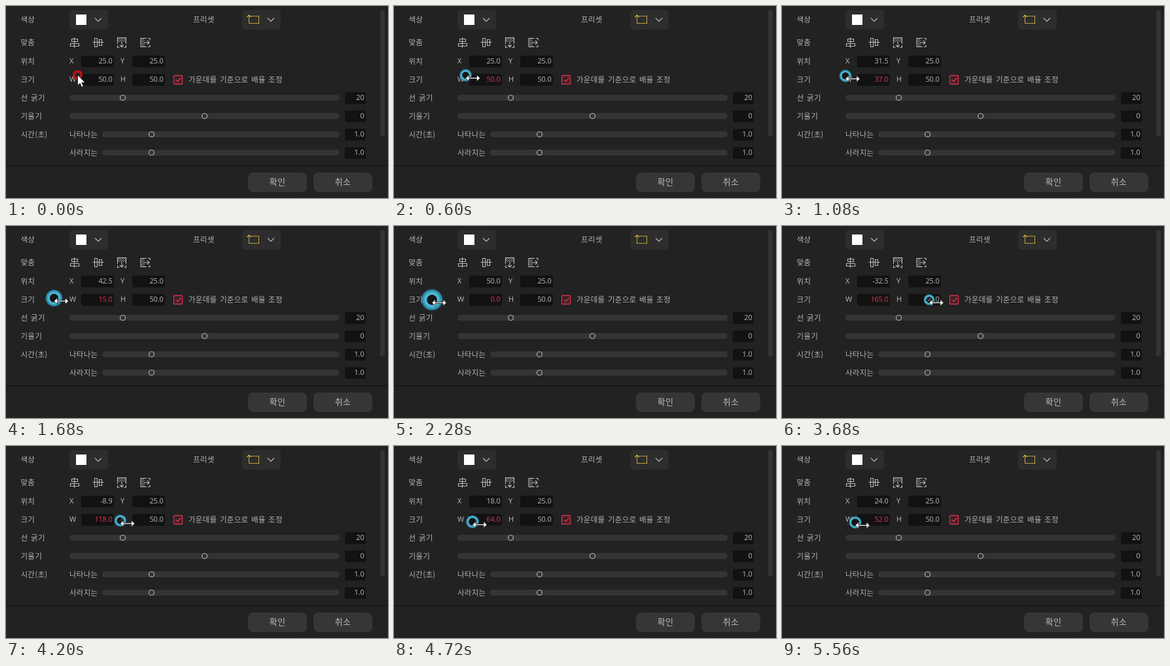
Write an HTML page that moves like this. It is 584 px wide and 294 px high and loops after 5.6 s.

```html
<!DOCTYPE html>
<html lang="ko">
<head>
<meta charset="utf-8">
<title>크기 조정</title>
<style>
html, body { margin: 0; width: 100%; height: 100%; overflow: hidden; background: #222; }
svg { display: block; width: 584px; height: 294px; }
text { font: 300 11.5px "Noto Sans CJK KR", "Noto Sans CJK", "Noto Sans KR", sans-serif; fill: #b4b4b4; letter-spacing: .28px; word-spacing: 1px; }
.num { font: 11px "Open Sans", "Noto Sans", sans-serif; letter-spacing: -.2px; fill: #bababa; }
.end { text-anchor: end; }
.btn { font-size: 13px; text-anchor: middle; fill: #bcbcbc; }
.line { fill: none; stroke: #b8b8b8; stroke-width: 1.1; }
</style>
</head>
<body>
<svg viewBox="0 0 584 294">
  <defs>
    <radialGradient id="glow">
      <stop id="hole" offset=".5" stop-color="#58c6e4" stop-opacity="0"/>
      <stop id="rim" offset=".5" stop-color="#58c6e4"/>
      <stop id="mid" offset=".75" stop-color="#2e9fc0" stop-opacity=".85"/>
      <stop offset="1" stop-color="#1c7896" stop-opacity="0"/>
    </radialGradient>
    <pattern id="hatch" width="3" height="3" patternUnits="userSpaceOnUse">
      <path d="M-1 1l2-2M0 3l3-3M2 4l2-2" stroke="#b8b8b8" stroke-width=".9"/>
    </pattern>
  </defs>
  <rect width="584" height="294" fill="#222"/>
  <g id="panel"></g>

  <rect x="107" y="13" width="16" height="16" fill="#fff"/>
  <g class="line">
    <path d="M136 18.5l5 5 5-5M400 18.5l5 5 5-5"/>
    <path d="M104.5 48v16M100.500 50.5h9v4h-9zM98.5 57.5h13v4h-13z"/>
    <path d="M132.500 55.5h17M135.5 49.5h4v13h-4zM142.5 51.5h4v9h-4z"/>
    <path d="M170.5 58v-9.5h13v9.5M170.5 60v3.500h3M183.5 60v3.500h-3M177 55v8M174 60l3 3 3-3"/>
    <path d="M215 49.500h-9v13h9M217 49.500h3v3M217 62.500h3v-3M211 56h8M216 53l3 3-3 3"/>
  </g>
  <rect x="171" y="49" width="12" height="6" fill="url(#hatch)"/>
  <rect x="207" y="50" width="5" height="12" fill="url(#hatch)"/>
  <path d="M371.5 15.5h15v11h-15z" fill="none" stroke="#e0bc38" stroke-width="1.1" stroke-dasharray="2.5 .7"/>
  <path d="M368.5 17l3-3 3 3" fill="none" stroke="#e0bc38" stroke-width="1.1"/>
  <rect x="256.5" y="106.5" width="13" height="13" rx="1" fill="#e0304e" fill-opacity=".1" stroke="#e0304e" stroke-width="1.3"/>
  <path d="M259.5 112.800l3 3 5-5.600" fill="none" stroke="#e0304e" stroke-width="1.4"/>

  <g id="halo">
    <circle id="core" fill="#121416"/>
    <circle id="ring" fill="url(#glow)"/>
  </g>
  <circle id="ripple" cx="109.5" cy="105.5" fill="none" stroke="#b51218"/>
  <path id="arrow" d="M109.5 105.5v16.2l3.700-3.500 2.500 6 2.700-1.100-2.500-5.800h5z" fill="#fff" stroke="#111" stroke-width=".8"/>
  <path id="drag" d="M-11 .5l5-5v4h12v-4l5 5-5 5v-4h-12v4z" fill="#fff" stroke="#111" stroke-width=".8"/>
</svg>
<script>
const LOOP = 5600, STEP = 40, DRAG_START = 520;
const $ = id => document.getElementById(id);
const panel = $('panel');

function add(tag, attrs, content) {
  const el = document.createElementNS('http://www.w3.org/2000/svg', tag);
  for (const k in attrs) el.setAttribute(k, attrs[k]);
  if (content) el.textContent = content;
  return panel.appendChild(el);
}
const box = (x, y, width, height, rx, fill) => add('rect', { x, y, width, height, rx, fill });
const label = (x, y, str) => add('text', { x, y: y + 4.8 }, str);
const num = (x, y, str, cls = 'num') => add('text', { x, y: y + 4, class: cls }, str);

function field(x, y, width, value) {
  box(x, y - 8, width, 18, 2, '#121212');
  return num(x + width - 2.5, y, value, 'num end');
}

function slider(x, y, knob, value) {
  box(x, y - 4, 510 - x, 9, 4.5, '#343434');
  add('circle', { cx: knob, cy: y + .5, r: 4, fill: '#343434', stroke: '#b0b0b0', 'stroke-width': 1.2 });
  field(518, y, 32, value);
}

function button(x, str) {
  box(x, 255, 90, 30, 8, '#363636');
  add('text', { x: x + 45, y: 274.3, class: 'btn' }, str);
}

[['색상', 20], ['맞춤', 55.5], ['위치', 84], ['크기', 112], ['선 굵기', 140], ['기울기', 168], ['시간(초)', 196]]
  .forEach(([str, y]) => label(22.5, y, str));
label(286, 20, '프리셋');
label(97, 196, '나타나는');
label(97, 224, '사라지는');
label(279, 112, '가운데를 기준으로 배율 조정');
box(97, 6, 59, 30, 5, '#2d2d2d');
box(361, 6, 59, 30, 5, '#2d2d2d');
num(97, 84, 'X');
num(175, 84, 'Y');
num(97, 112, 'W');
num(175, 112, 'H');
const posX = field(115, 84, 50, '25.0');
const sizeW = field(115, 112, 50, '50.0');
field(193, 84, 50, '25.0');
field(193, 112, 50, '50.0');
slider(97, 140, 178.5, '20');
slider(97, 168, 303.5, '0');
slider(147, 196, 222.5, '1.0');
slider(147, 224, 222.5, '1.0');
box(572, 6, 7, 194, 3.5, '#343434');
box(0, 244, 584, 1, 0, '#111');
button(370, '확인');
button(470, '취소');

// time, cursor x, cursor y, width, halo radius, hole radius, core opacity
const KEYS = [
  [520, 121, 110, 50, 10, 5.5, .7],
  [1080, 108, 111, 37, 10, 5.5, .8],
  [2280, 69, 117, 0, 17.5, 8, .9],
  [3000, 215, 117, 144, 12.5, 6, .9],
  [3680, 236, 117, 165, 9, 5, .3],
  [4720, 131, 120, 64, 10.5, 6, .85],
  [5560, 123, 121, 52, 10, 6, .8]
];

// Slope at a key; flat at turning points and ends.
function slope(i, c) {
  const a = KEYS[i - 1], b = KEYS[i], d = KEYS[i + 1];
  if (!a || !d) return 0;
  const m = (b[c] - a[c]) / (b[0] - a[0]), n = (d[c] - b[c]) / (d[0] - b[0]);
  return m * n <= 0 ? 0 : 2 * m * n / (m + n);
}

function sample(t, c) {
  let i = 0;
  while (i < KEYS.length - 2 && t >= KEYS[i + 1][0]) i++;
  const a = KEYS[i], b = KEYS[i + 1], d = b[0] - a[0];
  const u = Math.min(1, (t - a[0]) / d), v = 1 - u;
  return a[c] * v * v * (1 + 2 * u) + b[c] * u * u * (3 - 2 * u)
    + d * u * v * (slope(i, c) * v - slope(i + 1, c) * u);
}

const show = (el, on) => el.setAttribute('visibility', on ? 'visible' : 'hidden');

function setWidth(w, active) {
  let x = 50 - w / 2;
  if (x < 0 && x % 1 === 0) x += .1; // truncated toward zero
  posX.textContent = x.toFixed(1);
  sizeW.textContent = w.toFixed(1);
  sizeW.style.fill = active ? '#e8314f' : '';
}

function draw(t) {
  const dragging = t >= DRAG_START;
  const ripple = $('ripple');
  show($('arrow'), !dragging);
  show($('drag'), dragging);
  show($('halo'), dragging);
  show(ripple, t < 160);
  if (!dragging) {
    const p = Math.min(1, t / 160);
    ripple.setAttribute('r', 5.5 + 9 * p);
    ripple.setAttribute('stroke-width', 4 - 2 * p);
    ripple.setAttribute('opacity', 1 - p);
    setWidth(50, false);
    return;
  }
  const [x, y, w, r, hole, core] = [1, 2, 3, 4, 5, 6].map(c => sample(t, c));
  $('drag').setAttribute('transform', `translate(${x} ${y})`);
  $('halo').setAttribute('transform', `translate(${x - 11} ${y - 4})`);
  $('core').setAttribute('r', hole);
  $('core').setAttribute('opacity', core);
  $('ring').setAttribute('r', r);
  const edge = hole / r;
  $('hole').setAttribute('offset', edge - .06);
  $('rim').setAttribute('offset', edge + .04);
  $('mid').setAttribute('offset', edge + (1 - edge) * .7);
  setWidth(Math.max(0, Math.round(w)), true);
}

const start = performance.now();
function tick() {
  const t = (performance.now() - start) % LOOP;
  draw(Math.floor(t / STEP) * STEP);
  requestAnimationFrame(tick);
}
tick();
</script>
</body>
</html>
```
